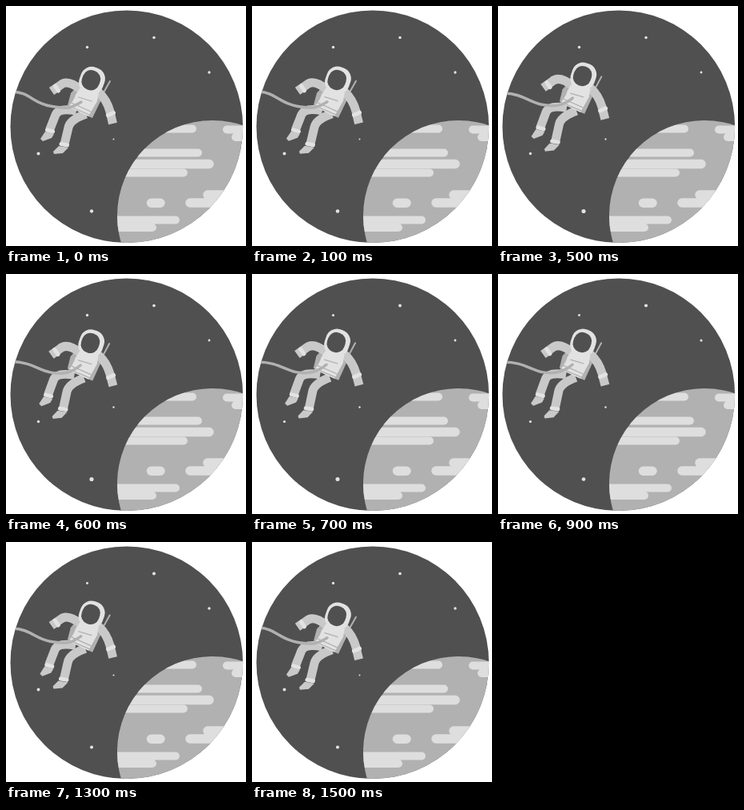
Write an HTML page that moves like this. It is 300x300 px and loops after 1.6 s.

```html
<!DOCTYPE html>
<html lang="en">
<head>
<meta charset="utf-8">
<title>Spacewalk</title>
<style>
  html, body { margin: 0; height: 100%; overflow: hidden; background: #fff; }
  svg { display: block; width: 100vw; height: 100vh; }
  .light { fill: #e2e2e2; }
  .shade { fill: #c9c9c9; }
  .mid { fill: #b1b1b1; }
  .dark { fill: #505050; }
  .line { fill: none; stroke: #b1b1b1; stroke-linecap: round; }
  .clouds { fill: none; stroke: #dedede; stroke-linecap: round; }
  .limb { fill: none; stroke: #c9c9c9; stroke-width: 11; stroke-linejoin: round; }
  .cuff { fill: none; stroke: #e2e2e2; stroke-width: 5; stroke-linecap: round; }
</style>
</head>
<body>
<svg viewBox="0 0 300 300">
  <clipPath id="sky"><circle cx="150.8" cy="150.8" r="145.3"/></clipPath>
  <clipPath id="globe"><circle cx="258" cy="262" r="119"/></clipPath>
  <g clip-path="url(#sky)">
    <rect class="dark" width="300" height="300"/>
    <g id="stars" class="light">
      <circle cx="40.5" cy="184.5" r="1.8"/>
      <circle cx="101.5" cy="51.5" r="1.6"/>
      <circle cx="107" cy="256.5" r="2.3"/>
      <circle cx="134.500" cy="166.500" r="1.1"/>
      <circle cx="185" cy="39.500" r="1.9"/>
      <circle cx="254" cy="83" r="1.6"/>
    </g>
    <g clip-path="url(#globe)">
      <rect class="mid" x="130" y="130" width="170" height="170"/>
      <path class="clouds" stroke-width="10"
        d="M120 153.500H233M276 154.500H320M287 164H320M120 183.500H240M120 208.500H222M120 267.500H212M120 277H183"/>
      <path class="clouds" stroke-width="11.5" d="M120 197.500H254M181.500 246.300H193M252 236H320M230 246H320"/>
    </g>

    <g id="body">
      <path class="line" stroke-width="2" d="M130 94L113 124"/>
      <path class="mid" d="M90 99L122 106L121 113L108 140L101 137L77 124L81 109Z"/>
      <g id="legs">
        <path class="limb" d="M88 131Q66 127 62 136L54.500 155"/>
        <path class="shade" d="M49 157L60 160L57 165L46 169L43 166Z"/>
        <path class="cuff" d="M51.500 155L58.500 157"/>
        <path class="limb" d="M100 135Q80 142 78 152L73 173"/>
        <path class="shade" d="M66 175L78 177L71 184L60 185L59 182Z"/>
        <path class="cuff" d="M69 172.500L76.500 174"/>
      </g>
      <path class="limb" d="M94 105Q77 91 68 99L57 106.500"/>
      <path class="cuff" d="M61.500 100L65.500 106"/>
      <path class="limb" d="M116 108Q126 117 130 132L133.500 147"/>
      <path class="cuff" d="M127.500 136.500L134.500 133.500"/>
      <path class="light" d="M93 102L116 108L114 119L103 138L78 126Q85 118 87 111Z"/>
      <path class="line" stroke-width="1.3" d="M82 121L106 132M79 125L104 136M91 114L107 119"/>
      <g transform="rotate(20 107 93)">
        <rect class="light" x="92" y="76" width="31" height="34" rx="14"/>
        <rect class="dark" x="95" y="80.5" width="22.5" height="25" rx="10.5"/>
      </g>
    </g>
    <path id="tether" class="line" stroke-width="3.5"/>
  </g>
</svg>
<script>
const LOOP = 1600, STEP = 100;
const get = id => document.getElementById(id);
const stars = [...get("stars").children].map(el => ({ el, r: +el.getAttribute("r") }));

const wave = (time, peak) => (1 + Math.cos((time - peak) / LOOP * 2 * Math.PI)) / 2;

function draw(now) {
  const time = Math.floor(now % LOOP / STEP) * STEP;
  const lift = wave(time, LOOP / 2);

  get("body").setAttribute("transform",
    `translate(${-lift} ${-7.5 * lift}) rotate(${-1.5 * lift} 106 92)`);
  get("legs").setAttribute("transform", `translate(${-3 * lift} ${1.5 * lift})`);
  get("tether").setAttribute("d",
    `M8 ${107 + 3 * lift}C30 ${108 + 2 * lift} ${33 + 9 * lift} ${121 - lift} ` +
    `55 ${125 - 2.5 * lift}S81 ${128 - 4 * lift} ${94 - lift} ${120 - 7 * lift}`);

  // Each star peaks a little later than its left neighbour
  stars.forEach(({ el, r }, i) =>
    el.setAttribute("r", r * (.88 + .24 * wave(time, i / stars.length * LOOP))));
}

function tick(now) {
  draw(now);
  requestAnimationFrame(tick);
}
draw(0);
requestAnimationFrame(tick);
</script>
</body>
</html>
```
